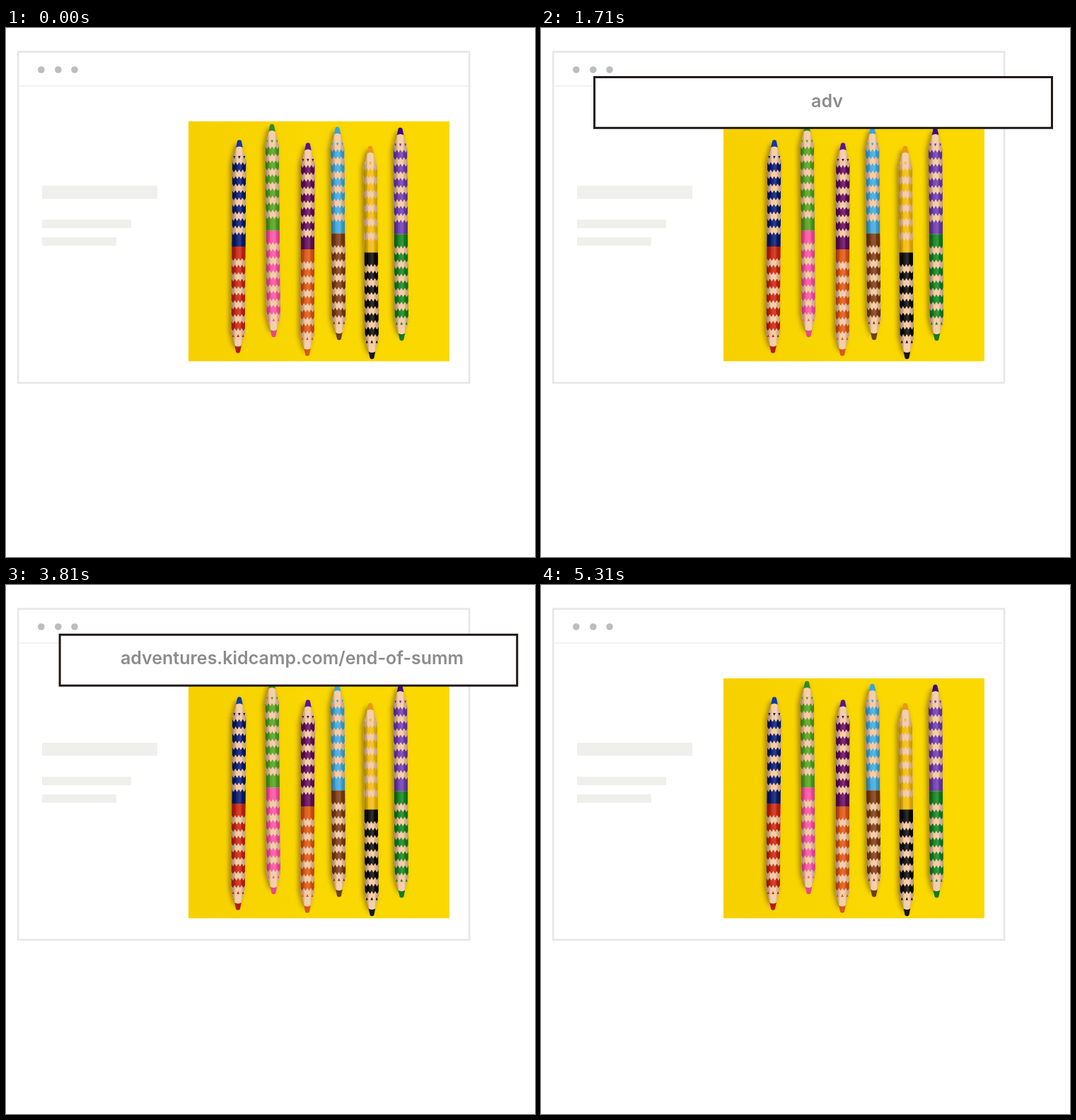
Animation of 748x748 px, one loop 5.4 s. Source, as an HTML page:

```html
<!DOCTYPE html>
<html lang="en">
<head>
<meta charset="utf-8">
<title>Typing a web address</title>
<style>
  html, body { margin: 0; width: 100%; height: 100%; overflow: hidden; background: #fff; }
  svg { display: block; width: 748px; height: 748px; }
  text { font: 600 25px Inter, "Open Sans", sans-serif; fill: #8c8c8c; text-anchor: middle; }
</style>
</head>
<body>
<svg viewBox="0 0 748 748">
  <defs>
    <linearGradient id="paper">
      <stop offset="0" stop-color="#f7d000"/>
      <stop offset=".45" stop-color="#f9d700"/>
      <stop offset="1" stop-color="#fbd900"/>
    </linearGradient>
    <linearGradient id="round">
      <stop offset="0" stop-color="#000" stop-opacity=".34"/>
      <stop offset=".28" stop-color="#000" stop-opacity=".1"/>
      <stop offset=".3" stop-color="#fff" stop-opacity=".04"/>
      <stop offset=".6" stop-color="#fff" stop-opacity=".16"/>
      <stop offset=".72" stop-color="#fff" stop-opacity=".04"/>
      <stop offset=".74" stop-color="#000" stop-opacity=".08"/>
      <stop offset="1" stop-color="#000" stop-opacity=".2"/>
    </linearGradient>
    <filter id="soft" x="-100%" y="-10%" width="300%" height="120%">
      <feGaussianBlur stdDeviation="3"/>
    </filter>
    <clipPath id="hull"><path d="M-4 9L4 9L9.7 30V272L4 293H-4L-9.7 272V30Z"/></clipPath>
    <clipPath id="photo"><rect x="258" y="132" width="369" height="339.5"/></clipPath>
  </defs>

  <rect x="17.2" y="33.7" width="638" height="468" fill="none" stroke="#e6e6e6" stroke-width="2.5"/>
  <path d="M19 82H658" stroke="#ececec" stroke-width="1.4"/>
  <g fill="#bdbdbd">
    <circle cx="49.8" cy="59" r="4.8"/><circle cx="73.8" cy="59" r="4.8"/><circle cx="97" cy="59" r="4.8"/>
  </g>
  <g fill="#efefec">
    <rect x="51" y="223" width="163" height="18.5"/>
    <rect x="51" y="271" width="126" height="12"/>
    <rect x="51" y="296" width="105" height="12"/>
  </g>
  <g clip-path="url(#photo)">
    <rect x="258" y="132" width="369" height="339.5" fill="url(#paper)"/>
    <g id="pencils"></g>
  </g>

  <g id="field">
    <rect id="edge" fill="#211915"/>
    <rect id="inside" fill="#fff"/>
    <text id="label" x="404.5" y="112"></text>
  </g>
</svg>

<script>
const $ = id => document.getElementById(id);
const LOOP = 5400, TICK = 30, LENGTH = 302;
const ADDRESS = "adventures.kidcamp.com/end-of-summer-sale";

// top x, top y, lean, upper colour, lower colour, upper tip, lower tip
const PENCILS = [
  [330, 158, -2, "#06186e", "#c9230d", "#0b3aa8", "#b01c14"],
  [376, 135.5, 2.5, "#52a01f", "#fb4fa3", "#2f8a22", "#e8488f"],
  [427, 162, -1, "#620a5a", "#dd5412", "#5a1590", "#d9571c"],
  [468.5, 139.5, 2.5, "#3fa8dc", "#7d3a12", "#35a5e0", "#6b4020"],
  [515, 166.5, 2.5, "#f2b90a", "#0b0908", "#e79a12", "#141414"],
  [557.5, 140.5, 2, "#6c39ae", "#13811f", "#3a0a86", "#0f7a26"]
];

function zigzag(y) {
  let d = "M-12.5 " + (y + 2);
  for (let i = 1; i <= 10; i++) d += `L${i * 2.5 - 12.5} ${y + (i % 2 ? -2 : 2)}`;
  return d;
}

function pencil([x, y, lean, upper, lower, upperTip, lowerTip]) {
  let bands = "";
  for (let k = 0; k < 6; k++) {
    const at = 29 + 19.8 * k;
    bands += zigzag(at) + zigzag(LENGTH - at);
  }
  const tip = color => `<path d="M-4.8 11L-2.8 1.5Q0 -1 2.8 1.5L4.8 11Q0 8 -4.8 11Z" fill="${color}"/>`;
  const teeth = color =>
    `<path d="M-8.5 23h3l-1.5 4zM-1.8 23h3.6l-1.8 4zM5.5 23h3l-1.5 4z" fill="${color}"/>`;
  const end = (color, point) => teeth(color) + tip(point);
  return `<g transform="matrix(1 0 ${lean / LENGTH} 1 ${x} ${y})">
    <path d="M-7 8L1 4L6 30V276L0 298L-8 290L-13 270V32Z" fill="#6b4a00" opacity=".6" filter="url(#soft)"/>
    <g clip-path="url(#hull)">
      <rect x="-10" width="20" height="${LENGTH}" fill="#f3c9a2"/>
      <rect x="-10" y="29" width="20" height="122" fill="${upper}"/>
      <rect x="-10" y="151" width="20" height="122" fill="${lower}"/>
      <path d="${bands}" fill="none" stroke="#f3c6a0" stroke-width="5"/>
      <rect x="-9.7" width="19.4" height="${LENGTH}" fill="url(#round)"/>
    </g>
    ${end(upper, upperTip)}
    <g transform="translate(0 ${LENGTH}) scale(1 -1)">${end(lower, lowerTip)}</g>
  </g>`;
}
$("pencils").innerHTML = PENCILS.map(pencil).join("");

// left, top, right, bottom, side border, top border
const SMALL = [120.2, 46.3, 635.7, 73.6, 2.4, 1.2];
const LARGE = [74, 68, 724, 142.8, 3, 3];
const RESTED = [74.6, 68.8, 724.2, 143.7, 3, 3];

// characters shown, time in ms
const TYPING = [[1, 1590], [3, 1710], [7, 1920], [8, 2040], [15, 2490], [16, 2610], [41, 4290]];

const clamp = v => Math.min(1, Math.max(0, v));
const mix = (a, b, p) => a + (b - a) * p;
const ease = p => p < .5 ? 2 * p * p : 1 - 2 * (1 - p) ** 2;

function timeOf(n) {
  const i = Math.max(1, TYPING.findIndex(stop => stop[0] >= n));
  const [n0, t0] = TYPING[i - 1], [n1, t1] = TYPING[i];
  return Math.round(mix(t0, t1, (n - n0) / (n1 - n0)) / TICK) * TICK;
}
const keyTimes = [...ADDRESS].map((_, i) => timeOf(i + 1));

function setRect(el, x, y, right, bottom) {
  const box = { x, y, width: right - x, height: bottom - y };
  for (const key in box) el.setAttribute(key, box[key]);
}

function draw(t) {
  const grow = ease(clamp((t - 1070) / 610));
  const [l, top, r, b, side, cap] =
    t >= 1740 ? RESTED : SMALL.map((v, i) => mix(v, LARGE[i], grow));
  setRect($("edge"), l, top, r, b);
  setRect($("inside"), l + side, top + cap, r - side, b - cap);

  $("field").setAttribute("opacity", Math.min(clamp((t - 210) / 840), clamp((5310 - t) / 180)));
  const shown = ADDRESS.slice(0, keyTimes.filter(k => k <= t).length);
  if ($("label").textContent !== shown) $("label").textContent = shown;
}

const start = performance.now();
function tick() {
  const t = (performance.now() - start) % LOOP;
  draw(Math.floor(t / TICK) * TICK);
  requestAnimationFrame(tick);
}
tick();
</script>
</body>
</html>
```
